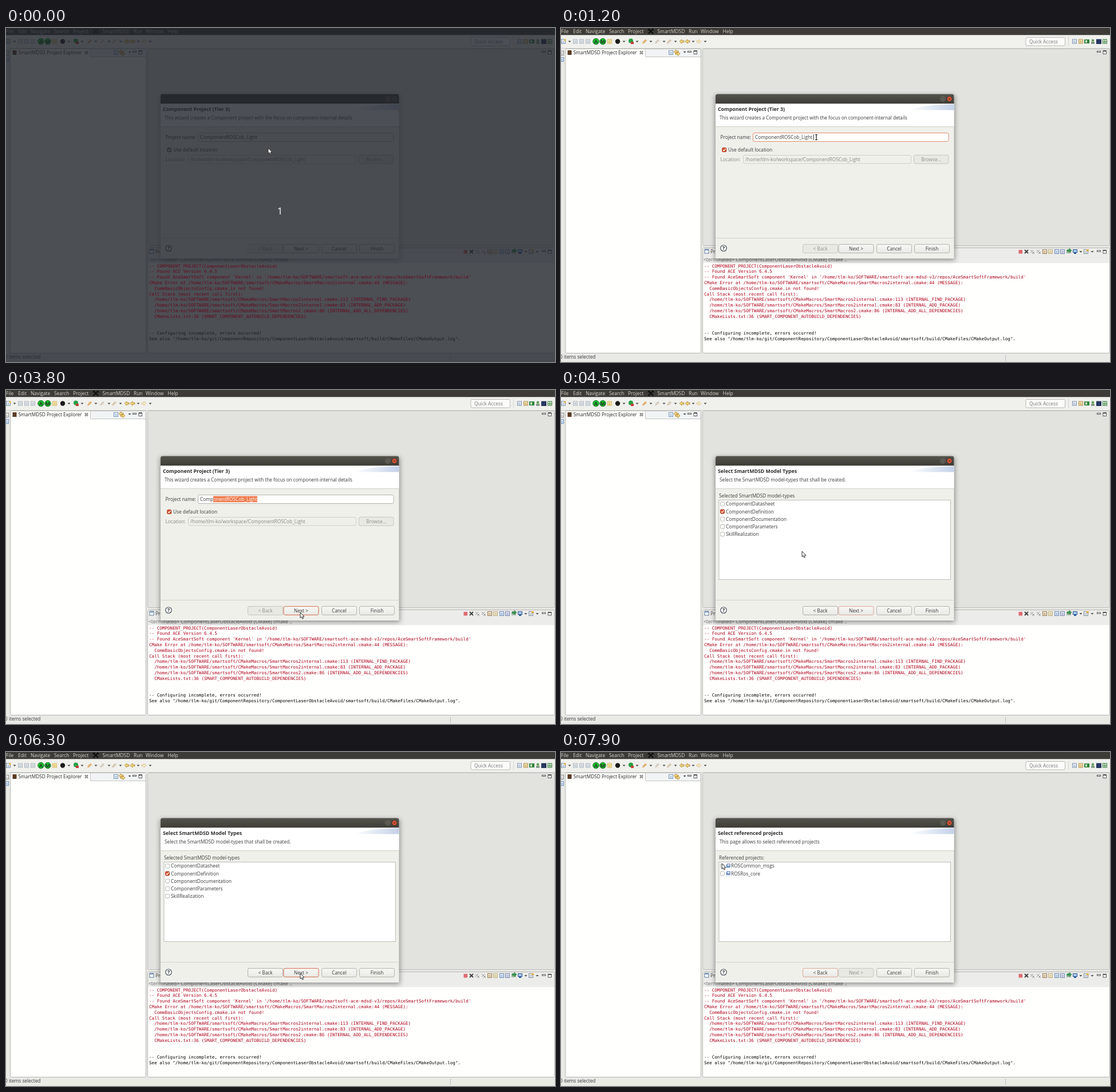
These frames come from a looping animation (959x584 px, 8000 ms). An HTML page:

```html
<!DOCTYPE html>
<html lang="en">
<head>
<meta charset="utf-8">
<title>Component project wizard</title>
<style>
html, body { margin: 0; width: 100%; height: 100%; overflow: hidden; background: #e9e9e6; }
svg { display: block; width: 100%; height: 100%; }
text { font: 8.3px "Open Sans", "Noto Sans", sans-serif; fill: #3a3a3a; white-space: pre; }
.bold { font-size: 8.8px; font-weight: 700; fill: #2c2c2c; }
.menu { font-size: 8.4px; fill: #d9d5cb; }
.mono { font: 7.607px "DejaVu Sans Mono", monospace; }
.off { fill: #868682; }
.mid { text-anchor: middle; }
</style>
</head>
<body>
<svg id="stage" viewBox="0 0 959 584" preserveAspectRatio="none">
  <defs>
    <linearGradient id="titleOn" x2="0" y2="1"><stop stop-color="#55544c"/><stop offset="1" stop-color="#3d3c37"/></linearGradient>
    <linearGradient id="swoosh"><stop stop-color="#fff"/><stop offset="1" stop-color="#c3d1e9"/></linearGradient>
    <linearGradient id="btn" x2="0" y2="1"><stop stop-color="#f7f7f4"/><stop offset="1" stop-color="#e9e9e5"/></linearGradient>
    <filter id="blur" x="-10%" y="-10%" width="120%" height="120%"><feGaussianBlur stdDeviation="4"/></filter>
    <clipPath id="selClip"><rect id="selClipBox" y="184" width="0" height="14"/></clipPath>
  </defs>
</svg>
<script>
const LOOP = 8000;
const NAME = "ComponentROSCob_Light";
const HOME = "/home/tlm-ko";
const stage = document.getElementById("stage");
const $ = id => document.getElementById(id);

// Markup helpers
const rect = (x, y, w, h, fill, more = "") => `<rect x="${x}" y="${y}" width="${w}" height="${h}" fill="${fill}" ${more}/>`;
const box = (x, y, w, h, fill, stroke, more = "") => rect(x, y, w, h, fill, `stroke="${stroke}" ${more}`);
const path = (d, stroke, fill = "none", more = "") => `<path d="${d}" stroke="${stroke}" fill="${fill}" ${more}/>`;
const disc = (x, y, r, fill, more = "") => `<circle cx="${x}" cy="${y}" r="${r}" fill="${fill}" ${more}/>`;
const esc = s => s.replace(/&/g, "&amp;").replace(/</g, "&lt;");
const text = (x, y, s, cls = "", more = "") => `<text x="${x}" y="${y}" class="${cls}" ${more}>${esc(s)}</text>`;
const group = (id, body, more = "") => `<g id="${id}" ${more}>${body}</g>`;
const caretDown = (x, y) => path(`M${x - 2.5} ${y - 1}h5l-2.5 2.8z`, "none", "#4a4a48");
const paneButtons = (x, y) => box(x - 2.5, y - 2, 6, 2, "#fff", "#333", 'stroke-width=".8"') +
  box(x + 8, y - 2.5, 5.5, 5.5, "#fff", "#333", 'stroke-width=".8"') + rect(x + 8, y - 3, 5.5, 1.6, "#333");
const page = (x, y, fill, edge) => box(x - 3.5, y - 3.5, 7, 7, fill, edge, 'stroke-width=".9"') +
  path(`M${x - 2} ${y - .5}h4m-4 2h4`, edge, "none", 'stroke-width=".7"');
const arrow = (x, y, dir, fill, edge) =>
  path(`M${x - 4 * dir} ${y - 1.3}h${4 * dir}v-2.2l${4 * dir} 3.5l${-4 * dir} 3.5v-2.2h${-4 * dir}z`, edge, fill, 'stroke-width=".8"');
const pen = (x, y, fill) => path(`M${x - 3.5} ${y + 3.5}l1-3l4-4l2 2l-4 4z`, fill, fill, 'stroke-width=".5" fill-opacity=".6"');

function menuBar() {
  const items = [[0, "File"], [21, "Edit"], [43, "Navigate"], [84, "Search"], [117, "Project"],
    [168.5, "SmartMDSD"], [223, "Run"], [244, "Window"], [282.5, "Help"]];
  return rect(0, 0, 959, 12.5, "#3c3b37") + items.map(([x, s]) => text(x, 9, s, "menu")).join("") +
    path("M152.5 10l8-8m-7.5 0l8 8M151.5 4l3.500-2.500m4 0l3 2.500", "#0c0c0c", "none", 'stroke-width="2"');
}

function toolBar() {
  const y = 23.5;
  let s = rect(0, 12.5, 959, 23, "#f0f0ed") + path("M0 35.5H959", "#d2d2ce");
  s += page(4, y, "#fff", "#5b7a9c") + rect(5.5, 19.5, 3, 3, "#e6b43c");
  for (const x of [25, 36, 47]) s += page(x, y, "#e0e4e8", "#a9b3bd");
  s += disc(61, y, 5.2, "#16c32c", 'stroke="#11701c"') + disc(73, y, 5.2, "#16c32c", 'stroke="#11701c"');
  s += text(61, 26.6, "A", "bold mid") + text(73, 26.6, "M", "bold mid");
  s += page(85, y, "#f5e2a8", "#d0b35a") + disc(99, y, 4.2, "#1b1b1b");
  s += disc(122, 22.5, 4, "#26a043") + rect(122, 24, 5, 4, "#c43d35");
  s += pen(146, y, "#d98a2b") + pen(168, y, "#c7b9a2") + pen(189, y, "#c7b08a");
  s += arrow(211, y, -1, "#f6dc83", "#a67c1e") + arrow(221, y, -1, "#f6dc83", "#a67c1e") + arrow(241, y, 1, "#f7efd0", "#d3bc7c");
  for (const x of [15, 110, 133, 157, 180, 200, 231, 252]) s += caretDown(x, y);
  s += box(812, 16.5, 68.5, 14.5, "#fbfbfa", "#bbb9b3", 'rx="2"') + text(818, 26.6, "Quick Access", "", 'style="fill:#777"');
  s += path("M886.5 16v16", "#bbb", "none", 'stroke-dasharray="1 1"');
  s += page(897, y, "#eef2f8", "#6f87a6") + page(908, y, "#f4e3b0", "#a98645") + rect(914, 20, 9, 7, "#2d8438") +
    rect(916, 21.5, 3, 4, "#e6f3e4") + disc(929, 21.8, 2.3, "#5f9b55") + rect(926, 24.5, 6, 3, "#6e8a73") +
    rect(935, 19.5, 9, 8.5, "#27375f") + box(946.5, 20, 7, 7, "#e7f0df", "#2f7a38") + path("M950 20v7M946.5 24h7", "#2f7a38");
  return s;
}

function explorer() {
  return box(7.5, 36.5, 237, 532, "#fffffd", "#b4b3ae", 'rx="2"') +
    rect(148, 37, 96, 13.5, "#f1f3f5") + path("M148 50.5H244M147.5 37v13.5", "#c5c5c1") +
    rect(11.5, 39, 7, 8, "#5c3c22") +
    text(21.5, 46.3, "SmartMDSD Project Explorer", "", 'style="fill:#222"') +
    path("M138 40.500l5 5m0-5l-5 5", "#555", "none", 'stroke-width="2"') + path("M138.500 41l4 4m0-4l-4 4", "#fff", "none", 'stroke-width=".8"') +
    page(192, 43, "#eef4fb", "#6b8db3") + arrow(201, 41.5, -1, "#f4d783", "#a97e25") + arrow(204, 45, 1, "#f4d783", "#a97e25") +
    caretDown(216, 42) + paneButtons(224, 42.5) +
    page(1, 44, "#fff", "#777") + page(1, 55, "#e4eefb", "#5b84b8");
}

function consolePane() {
  const y = 391;
  let s = box(247.5, 36.5, 711, 344, "#e2e2df", "#bdbdb8", 'rx="2"') + paneButtons(939, 42.5);
  s += box(247.5, 384.5, 711, 184, "#fffffd", "#b4b3ae", 'rx="2"') + rect(248, 385, 710, 26, "#ececea");
  s += box(251, 387, 7, 7, "#fff", "#5b7795") + rect(251, 387, 7, 2, "#7796bd") + text(261, 394, "Problems");
  s += rect(799.5, 388, 6.5, 6.5, "#dd6b70");
  s += path("M810 388l6 6m0-6l-6 6", "#444", "none", 'stroke-width="2"');
  for (const x of [821, 832]) s += path(`M${x - 1} 388l5 5m0-5l-5 5m3-2l4 4m0-4l-4 4`, "#8f8f8d");
  s += page(845, y, "#f7ead6", "#8b6d43") + page(855, y, "#f2e9cd", "#b7a673") + page(866, y, "#e7eef8", "#5b7cad") + page(876, y, "#f0e6ee", "#5b7cad");
  s += rect(883, 389, 8, 5, "#a0b8a4") + arrow(888, 389, 1, "#3b9a53", "#2a7a3d");
  s += box(894.5, 387.5, 7, 5, "#a8c8ee", "#2d5795") + rect(896, 393, 4, 2, "#2d5795");
  s += page(917, y, "#f7f7f3", "#6c7f92") + rect(918, 387, 4, 3, "#e2ad37") + caretDown(908, y) + caretDown(928, y) + paneButtons(939, y);
  s += text(249, 407.5, "<terminated> ComponentLaserObstacleAvoid [CMake] cmake ..", "", 'style="fill:#666;font-size:8.5px"');
  const macros = `  ${HOME}/SOFTWARE/smartsoft/CMakeMacros/`;
  const lines = [
    "-- COMPONENT_PROJECT(ComponentLaserObstacleAvoid)",
    "-- Found ACE Version 6.4.5",
    `-- Found AceSmartSoft component 'Kernel' in '${HOME}/SOFTWARE/smartsoft-ace-mdsd-v3/repos/AceSmartSoftFramework/build'`,
    `CMake Error at ${HOME}/SOFTWARE/smartsoft/CMakeMacros/SmartMacros2internal.cmake:44 (MESSAGE):`,
    "  CommBasicObjectsConfig.cmake.in not found!",
    "Call Stack (most recent call first):",
    macros + "SmartMacros2internal.cmake:113 (INTERNAL_FIND_PACKAGE)",
    macros + "SmartMacros2internal.cmake:83 (INTERNAL_ADD_PACKAGE)",
    macros + "SmartMacros2.cmake:86 (INTERNAL_ADD_ALL_DEPENDENCIES)",
    "  CMakeLists.txt:36 (SMART_COMPONENT_AUTOBUILD_DEPENDENCIES)",
    "", "",
    "-- Configuring incomplete, errors occurred!",
    `See also "${HOME}/git/ComponentRepository/ComponentLaserObstacleAvoid/smartsoft/build/CMakeFiles/CMakeOutput.log".`
  ];
  const row = (s, i, fill) => text(250, 418.7 + i * 9.78, s, "mono", `style="fill:${fill}"`);
  s += group("errors", lines.slice(0, 10).map((l, i) => row(l, i, "inherit")).join(""), 'fill="#ac001c"');
  return s + row(lines[12], 12, "#000") + row(lines[13], 13, "#000");
}

const statusBar = () => text(-2, 578, "0 items selected") +
  path("M776.5 572v10", "#999", "none", 'stroke-dasharray="1.5 1.5"');

const check = (x, y, on, id = "") => box(x - 3.5, y - 3.5, 7, 7, on ? "#d9532f" : "#fbfbfa", on ? "#a83b20" : "#b9b8b3", `rx="1.5" id="${id}"`) +
  (on ? path(`M${x - 2} ${y}l1.5 1.8l3-4`, "#fff", "none", 'stroke-width="1.3"') : "");
const button = (id, x, y, w, label) =>
  box(x, y, w, 15, "url(#btn)", "#b5b3ad", `rx="2.5" id="${id}Box"`) + text(x + w / 2, y + 10.6, label, "mid", `id="${id}Label"`);
const heading = (title, note, size = 8.3) => text(274, 145, title, "bold") + text(277, 160.4, note, "", `style="font-size:${size}px"`);
const list = (label, body) => text(276, 187.5, label) + box(276, 192.5, 404.5, 139, "#fff", "#bdbcb7") + body;
const rowY = i => 199.3 + i * 13.2;

function namePage() {
  const field = fill => text(339, 193.8, NAME, "", `style="fill:${fill}"`);
  return heading("Component Project (Tier 3)", "This wizard creates a Component project with the focus on component-internal details", 8.19) +
    text(278.5, 193.8, "Project name:") + box(335.5, 183.5, 341.5, 15, "#fff", "#b5b3ad", 'rx="2.5" id="field"') +
    field("#3c3c3c").replace("<text", '<text id="name"') +
    rect(0, 185.5, 0, 10.7, "#ee7a4c", 'id="sel"') + `<g clip-path="url(#selClip)">${field("#fff")}</g>` +
    rect(440.8, 186, .9, 10, "#222", 'id="caret"') +
    check(285.2, 213, true, "useDefault") + text(292, 216, "Use default location") +
    text(278.5, 232.8, "Location:", "off") + box(318.5, 222.5, 293, 14.5, "#f0f0eb", "#cfcec9", 'rx="2.5"') +
    text(322, 232.8, `${HOME}/workspace/${NAME}`, "off") + button("browse", 616.5, 222.2, 60.5, "Browse...");
}

function typePage() {
  const types = ["ComponentDatasheet", "ComponentDefinition", "ComponentDocumentation", "ComponentParameters", "SkillRealization"];
  return heading("Select SmartMDSD Model Types", "Select the SmartMDSD model-types that shall be created.") +
    list("Selected SmartMDSD model-types", types.map((s, i) => check(282, rowY(i), i === 1) + text(288, rowY(i) + 3.1, s)).join(""));
}

function refPage() {
  const row = (s, i) => check(282, rowY(i), false) + rect(288.5, rowY(i) - 2, 7, 5, "#7f9fd0") +
    box(290, rowY(i) - 3.5, 5, 4, "#e8effa", "#3d5f9e", 'stroke-width=".9"') + text(297, rowY(i) + 3.1, s);
  return heading("Select referenced projects", "This page allows to select referenced projects") +
    list("Referenced projects:", ["ROSCommon_msgs", "ROSRos_core"].map(row).join(""));
}

function dialog() {
  return rect(269, 118, 419, 288, "#000", 'id="shadow" filter="url(#blur)"') +
    path("M270 403V119q0-3.5 3.5-3.5H683q3.5 0 3.5 3.5V403z", "none", "#f0f0eb") +
    path("M270 132.5V119q0-3.5 3.5-3.5H683q3.5 0 3.5 3.5v13.5z", "none", "#3c3b37", 'id="title"') +
    disc(667, 124, 4.2, "#4a4943", 'stroke="#7b7970" stroke-width=".8"') +
    disc(678.5, 124, 4.4, "#4a4943", 'stroke="#7b7970" stroke-width=".8" id="close"') +
    box(665.3, 122.3, 3.4, 3.4, "none", "#7b7970", 'stroke-width=".8"') +
    path("M676.8 122.3l3.4 3.4m0-3.4l-3.4 3.4", "#7b7970", "none", 'id="closeMark"') +
    rect(270, 132.5, 416.5, 39.5, "#fff") + path("M607 143.5q28-10 79.5-10v10z", "none", "url(#swoosh)") +
    path("M270 172.5H686.5", "#cfcfca") + path("M270 367.5H686.5", "#d2d2cd") +
    group("page0", namePage()) + group("page1", typePage()) + group("page2", refPage()) +
    disc(284, 385, 5.3, "#fafaf8", 'stroke="#3b4654" stroke-width="1.1"') + text(284, 388.3, "?", "bold mid") +
    button("back", 422.5, 378.3, 61, "< Back") + button("next", 485, 378.3, 61, "Next >") +
    button("cancel", 551.5, 378.3, 61, "Cancel") + button("finish", 617.5, 378.3, 61, "Finish");
}

const overlay = () => group("overlay", rect(0, 0, 959, 584, "rgb(32,36,43)", 'opacity=".8"') +
  '<use href="#errors" opacity=".38"/>' + text(478.5, 326, "1", "mid", 'style="font-size:17px;fill:#fff"'));

const pointer = () => group("cursor",
  group("arrow", path("M0 0V9.5L2.2 7.6L3.8 11L5.5 10.3L4 7.1H6.9Z", "#1c1c1c", "#fff", 'stroke-width=".9"')) +
  group("beam", path("M-2-4.5h4M-2 4.5h4M0-4.5v9", "#111", "none", 'stroke-width="1.2"')));

stage.insertAdjacentHTML("beforeend", rect(0, 0, 959, 584, "#e9e9e6") + menuBar() + toolBar() + explorer() +
  consolePane() + statusBar() + dialog() + overlay() + pointer());

// Pointer route: time, x, y
const route = [[100, 458, 210], [900, 446, 191], [1200, 446, 191], [2000, 364, 191], [2200, 366, 195], [2400, 381, 214],
  [2700, 477, 320], [3000, 522, 383], [3100, 522, 383], [3200, 514, 389], [4200, 514, 389], [4500, 421, 282],
  [4600, 421, 282], [5200, 281, 209], [5300, 281, 209], [6200, 514, 386], [6300, 514, 387], [6800, 514, 387],
  [6900, 425, 346], [7000, 425, 346], [7500, 281, 197], [7800, 281, 197], [7900, 281, 195]];

function pointerAt(t) {
  const i = route.findIndex(p => p[0] >= t);
  if (i === 0) return route[0].slice(1);
  if (i < 0) return route[route.length - 1].slice(1);
  const [t0, x0, y0] = route[i - 1], [t1, x1, y1] = route[i];
  const k = (t - t0) / (t1 - t0);
  return [x0 + (x1 - x0) * k, y0 + (y1 - y0) * k];
}

const show = (id, on) => $(id).style.display = on ? "" : "none";
const set = (id, key, value) => $(id).setAttribute(key, value);

function setButton(id, enabled, focused, hovered) {
  set(id + "Box", "stroke", hovered ? "#d4694b" : focused ? "#d9a595" : enabled ? "#b0aea8" : "#c6c5c0");
  set(id + "Box", "fill", enabled ? "url(#btn)" : "#e9e9e4");
  $(id + "Label").style.fill = enabled ? "#3a3a3a" : "#90908c";
}

function setSelection(t, x) {
  const name = $("name"), end = name.getEndPositionOfChar(NAME.length - 1).x;
  let from = NAME.length;
  if (t >= 1300) {
    const target = t >= 2000 ? 0 : x;
    while (from > 4 && name.getStartPositionOfChar(from - 1).x >= target - 2) from--;
  }
  const start = from < NAME.length ? name.getStartPositionOfChar(from).x : end;
  for (const id of ["sel", "selClipBox"]) {
    set(id, "x", start);
    set(id, "width", Math.max(0, end - start));
  }
  show("caret", t >= 1100 && from === NAME.length);
}

function draw(time) {
  const t = Math.floor(time / 100) * 100;
  const [x, y] = pointerAt(t);
  const active = t >= 1100;
  const current = t < 4000 ? 0 : t < 6500 ? 1 : 2;
  const overNext = x >= 485 && x <= 546 && y >= 378 && y <= 394;
  const overField = current === 0 && y < 198.5;

  show("overlay", t < 100);
  for (let i = 0; i < 3; i++) show("page" + i, i === current);
  set("shadow", "opacity", active ? .38 : .25);
  set("title", "fill", active ? "url(#titleOn)" : "#3c3b37");
  set("close", "fill", active ? "#e2593a" : "#4a4943");
  set("close", "stroke", active ? "#3a2a22" : "#7b7970");
  set("closeMark", "stroke", active ? "#4a2318" : "#7b7970");
  set("useDefault", "fill", active ? "#d9532f" : "#858581");
  set("useDefault", "stroke", active ? "#a83b20" : "#70706c");
  set("field", "fill", active ? "#fff" : "#f2f2ee");
  set("field", "stroke", active && t < 3800 ? "#e08c70" : "#b5b3ad");
  if (current === 0) setSelection(t, x);

  setButton("back", current > 0, current === 2, false);
  setButton("next", current < 2, t >= 3800 && current < 2, overNext && current < 2);
  setButton("browse", false, false, false);

  set("cursor", "transform", `translate(${x} ${y})`);
  show("arrow", !overField);
  show("beam", overField);
}

function frame() {
  draw(performance.now() % LOOP);
  requestAnimationFrame(frame);
}
frame();
</script>
</body>
</html>
```
